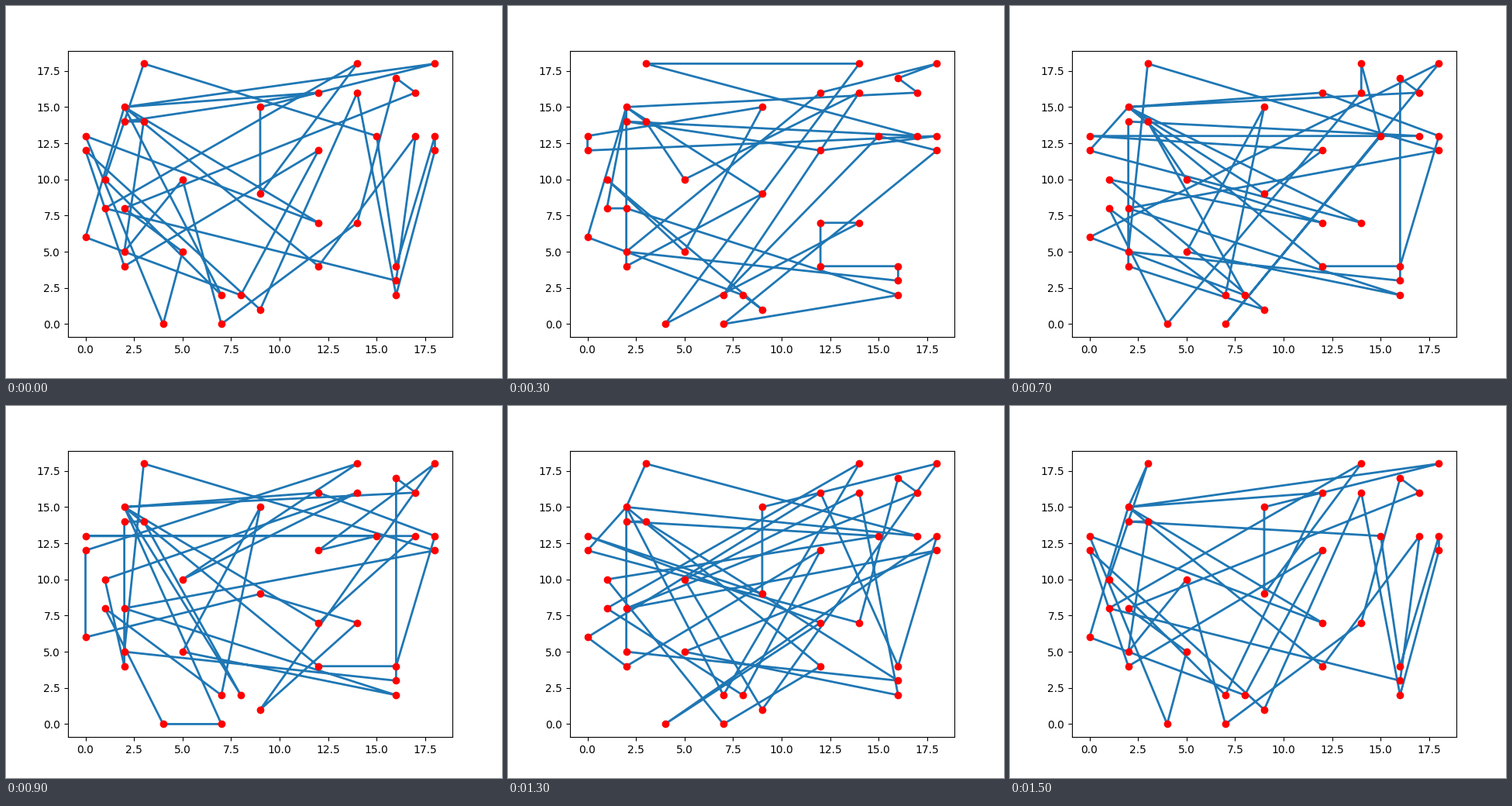
Animation, 640 px wide and 480 px high, one loop 1600 ms. Source, as a matplotlib script:

```python
import matplotlib.pyplot as plt
from matplotlib.animation import FuncAnimation

FRAMES, INTERVAL = 16, 100

STOPS = [
    (3, 18), (14, 18), (18, 18), (16, 17), (17, 16), (14, 16), (12, 16),
    (9, 15), (2, 15), (2, 14), (3, 14), (15, 13), (17, 13), (18, 13),
    (18, 12), (12, 12), (0, 13), (0, 12), (1, 10), (5, 10), (9, 9),
    (1, 8), (2, 8), (0, 6), (2, 5), (5, 5), (2, 4), (12, 7), (14, 7),
    (12, 4), (16, 4), (16, 3), (16, 2), (7, 2), (8, 2), (9, 1), (4, 0),
    (7, 0),
]
# Stops are named A..Z, a..l; stop I is visited three times per tour.
NAMED = dict(zip("ABCDEFGHIJKLMNOPQRSTUVWXYZabcdefghijkl", STOPS))

# Closed tours by step; the first one is followed by a hard jump.
TOURS = {
    0: "ICHUBVfMdIGJKYTlcDEWZkQbIXiPaRjFgONeLASh",
    3: "IEDCGYfedbckBAMJPNRQHZSjiXIUaIVWglOLhFTK",
    5: "IEDfYGCZHQPUIIXiKTbdeSjaJMhcRNAOWglLBFkV",
    9: "IGNedIEDfYAOWgZHhVklIiKJaSFTBRXUcjCPLQMb",
    11: "IGNkCjXUQbSLPWOZgFTBRcDEiVhHAYaIMfKJIled",
    13: "IAMIRcDEWOZgFTjCHUQbkNeGXaPiVBhIYfKJLSld",
    15: "IAShGIXiPaRjFgONeLJKYTlcDEWZkQbICHUBVfMd",
}


def rewire(start, goal, share):
    """Carry out a share of the segment reversals that turn start into goal."""
    tour, stages = list(start), [list(start)]
    for k, stop in enumerate(goal):
        if tour[k] != stop:
            end = tour.index(stop, k) + 1
            tour[k:end] = tour[k:end][::-1]
            stages.append(list(tour))
    return stages[round(share * (len(stages) - 1))]


def tour_at(step):
    if step in TOURS:
        return TOURS[step]
    before = max(s for s in TOURS if s < step)
    after = min(s for s in TOURS if s > step)
    begin = before if before else -1  # the jump already covers half the way
    share = (step - begin) / (after - begin)
    return rewire(TOURS[before], TOURS[after], share)


def path(tour):
    closed = list(tour) + [tour[0]]
    return zip(*(NAMED[name] for name in closed))


fig, ax = plt.subplots(figsize=(6.4, 4.8), dpi=100)
line, = ax.plot(*path(TOURS[0]), color="tab:blue", lw=2)
ax.plot(*zip(*STOPS), "ro")


def draw(step):
    line.set_data(*map(list, path(tour_at(step))))
    return line,


anim = FuncAnimation(fig, draw, frames=FRAMES, interval=INTERVAL,
                     repeat=True, repeat_delay=0)
plt.show()
```
